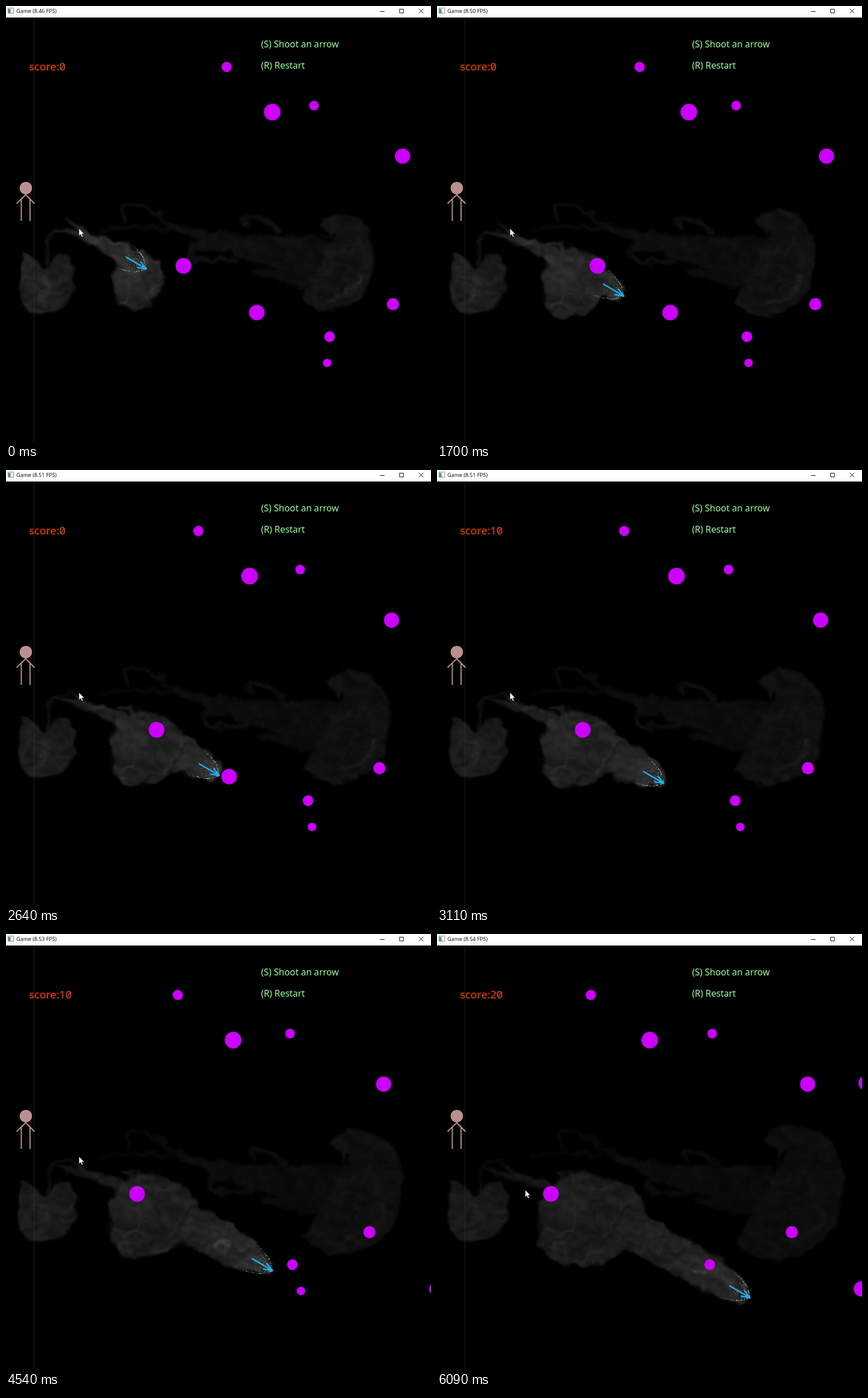
An HTML page with a canvas for the animation above (6260 ms loop, 739 by 758 pixels).

```html
<!DOCTYPE html>
<html lang="en">
<head>
<meta charset="utf-8">
<title>Game</title>
<style>
  html, body { margin: 0; width: 100%; height: 100%; overflow: hidden; background: #000; }
  canvas, svg { position: absolute; left: 0; top: 0; display: block; }
  text { font-family: "Noto Sans", sans-serif; }
  .bar { font: 9.3px "Open Sans", sans-serif; }
  .help { font-size: 15.75px; fill: #99ff99; }
  .score { font-size: 18.8px; fill: #ff4400; }
  .line { fill: none; stroke-linecap: round; }
</style>
</head>
<body>
<canvas id="stage" width="739" height="758"></canvas>
<svg width="739" height="758" viewBox="0 0 739 758">
  <rect width="739" height="20" fill="#fff"/>
  <rect x="3.5" y="3.5" width="10" height="9" fill="#f4f7f6" stroke="#8a9793"/>
  <rect x="4" y="5" width="4" height="7" fill="#4f9b80"/>
  <text id="title" class="bar" x="18" y="12"></text>
  <g class="line" stroke="#111">
    <path d="M650.5 9.5H658"/>
    <rect x="684.5" y="5.5" width="6.5" height="6.5"/>
    <path d="M718 5l7.5 7.5m0 -7.5l-7.5 7.5"/>
  </g>
  <text class="help" x="443.5" y="72">(S) Shoot an arrow</text>
  <text class="help" x="443.5" y="109">(R) Restart</text>
  <text id="score" class="score" x="40.3" y="112"></text>
  <path id="slash" class="line" stroke="#ff4400" stroke-width="1.2" d="M-2.3 3.5L2.3 -3.5"/>
  <circle cx="34.5" cy="316.5" r="10.8" fill="#bc8f8f"/>
  <path class="line" stroke="#bc8f8f" stroke-width="2" d="M19 343L34.3 328L49 343M26.6 336V373M41.8 336V373"/>
  <path id="cursor" fill="#fff" stroke="#222" stroke-width=".6" d="M0 0V12.5L2.8 10L4.8 14.6L6.8 13.7L4.8 9.2H8.7Z"/>
</svg>
<script>
const LOOP = 6260, LAST = 52;
const W = 739, H = 340, TOP = 320;
const $ = id => document.getElementById(id);
const ctx = $('stage').getContext('2d');
const mix = (a, b, u) => a + (b - a) * u;
const clamp = (v, lo, hi) => Math.max(lo, Math.min(hi, v));

function layer() {
  const c = document.createElement('canvas');
  c.width = W;
  c.height = H;
  return c.getContext('2d', { willReadFrequently: true });
}
const raw = layer(), soft = layer();
const out = ctx.createImageData(W, H);

function random(seed) {
  return () => {
    seed = (seed + 0x6D2B79F5) | 0;
    let t = Math.imul(seed ^ (seed >>> 15), 1 | seed);
    t = (t + Math.imul(t ^ (t >>> 7), 61 | t)) ^ t;
    return ((t ^ (t >>> 14)) >>> 0) / 4294967296;
  };
}

// Smooth value noise and the fields built from it
const grid = Float32Array.from({ length: 4096 }, random(11));
function noise(x, y) {
  const i = Math.floor(x), j = Math.floor(y);
  let u = x - i, v = y - j;
  u *= u * (3 - 2 * u);
  v *= v * (3 - 2 * v);
  const g = (a, b) => grid[((b & 63) << 6) | (a & 63)];
  return mix(mix(g(i, j), g(i + 1, j), u), mix(g(i, j + 1), g(i + 1, j + 1), u), v);
}
const warpX = new Float32Array(W * H), warpY = new Float32Array(W * H), tone = new Float32Array(W * H);
for (let y = 0, k = 0; y < H; y++) {
  for (let x = 0; x < W; x++, k++) {
    const amp = x > 400 && y < 170 ? 7 : 11;
    const a = noise(x / 17, y / 17), b = noise(x / 17 + 31, y / 17 + 9);
    warpX[k] = (a - .5) * amp + (noise(x / 7, y / 7) - .5) * 3;
    warpY[k] = (b - .5) * amp + (noise(x / 7 + 20, y / 7) - .5) * 3;
    const n = noise(x / 24 + a * 2.2, y / 15 + b * 2.2);
    const fine = noise(x / 9 + b * 2.5 + 40, y / 7 + a * 2.5);
    tone[k] = .6 + .55 * n + .3 * fine;
  }
}

// Catmull-Rom curve through flat x, y pairs
function spline(p, closed) {
  const n = p.length / 2, spans = closed ? n : n - 1, pts = [];
  const at = (i, c) => p[(closed ? (i + n) % n : clamp(i, 0, n - 1)) * 2 + c];
  for (let k = 0; k < spans * 16; k++) {
    const i = k >> 4, t = (k & 15) / 16;
    pts.push([0, 1].map(c => {
      const a = at(i - 1, c), b = at(i, c), d = at(i + 1, c), e = at(i + 2, c);
      return b + .5 * t * (d - a + t * (2 * a - 5 * b + 4 * d - e + t * (3 * (b - d) + e - a)));
    }));
  }
  return pts;
}

const gray = v => `rgb(${v},${v},${v})`;
const tip = s => [244 + 5.77 * s, 457 + 3.37 * s];
const DIR = [.864, .504];

function dots(c, pts) {
  c.beginPath();
  for (const [x, y, r] of pts) {
    c.moveTo(x, y);
    c.arc(x, y, Math.max(.5, r), 0, 7);
  }
  c.fill();
}

// Scale and shift each smoke part reaches by the end of the loop
const puff = [1.14, 1, -9.5, -1], head = [2.06, 1.56, -207, -245], cap = [1.5, 1.4, -250, -175];
const shift = (x, y) => [1, 1, x, y];
const tail = [1.1, .87, -8, 75];

function paintSmoke(u) {
  const pose = (pts, move) => pts.map((v, i) => mix(v, v * move[i % 2] + move[2 + i % 2], u));
  const blob = (g0, g1, move, ...pts) => {
    raw.fillStyle = gray(mix(g0, g1, u));
    raw.beginPath();
    spline(pose(pts, move), true).forEach(p => raw.lineTo(...p));
    raw.fill();
  };
  const strand = (g0, g1, r0, r1, move, ...pts) => {
    raw.fillStyle = gray(mix(g0, g1, u));
    const path = spline(pose(pts, move));
    dots(raw, path.map((p, i) => [...p, mix(r0, r1, (i / path.length) ** 1.5)]));
  };

  blob(29, 23, puff, 26, 436, 48, 438, 66, 457, 97, 431, 113, 446, 110, 508, 64, 535, 30, 515);
  strand(40, 26, 5, 9, puff, 64, 472, 70, 488, 64, 512);
  strand(22, 13, 3, 2, [1.07, 1, 0, 5], 70, 448, 74, 398, 104, 386);

  blob(18, 12, cap, 545, 380, 580, 362, 624, 382, 638, 440, 618, 502, 565, 530, 516, 512, 530, 480, 562, 405);
  strand(30, 15, 4, 5, cap, 565, 510, 606, 490, 614, 466);
  strand(14, 10, 6, 42, shift(10, 3), 300, 386, 370, 407, 450, 425, 550, 440);
  strand(10, 6, 3, 6, shift(0, -4), 165, 390, 230, 386, 300, 388);
  strand(13, 8, 3, 5, shift(12, -2), 205, 375, 205, 348, 250, 356, 305, 390);
  strand(14, 10, 5, 7, shift(48, 8), 395, 440, 330, 440, 325, 418, 370, 416);
  strand(14, 10, 4, 6, shift(14, 12), 420, 382, 415, 367, 450, 371, 475, 390);
  strand(14, 10, 5, 12, shift(20, 2), 435, 462, 470, 468, 520, 478);

  blob(36, 27, head, 188, 455, 215, 424, 258, 435, 274, 475, 248, 518, 210, 527, 189, 508, 188, 480);
  strand(44, 29, 2, 4, head, 262, 445, 267, 480, 247, 509);
  strand(42, 24, 1, mix(24, 16, u), tail, 106, 370, 140, 398, 180, 420, 225, 445);
  strand(34, 19, 1, 8, tail, 82, 386, 108, 390, 160, 412);
  strand(34, 20, 3, 7, shift(28, 6), 182, 411, 208, 414, 230, 432);

  raw.globalCompositeOperation = 'source-over';
  strand(0, 0, 2, mix(2, 4, u), cap, 543, 402, 564, 408, 569, 397);
}

function drawSmoke(s) {
  raw.globalCompositeOperation = 'source-over';
  raw.setTransform(1, 0, 0, 1, 0, -TOP);
  raw.fillStyle = '#000';
  raw.fillRect(0, TOP, W, H);
  raw.globalCompositeOperation = 'lighten';
  paintSmoke(s / LAST);
  raw.globalCompositeOperation = 'lighten';

  // Wake of the arrow widens with age
  for (let k = -2; k < s; k += .25) {
    const age = s - k, d = age * 6.68;
    raw.fillStyle = gray(26 + 18 * Math.exp(-age / 13));
    dots(raw, [[...tip(k), Math.min(d, 31, 3.6 * Math.sqrt(d))]]);
  }
  if (s > 28) {
    raw.fillStyle = gray(58);
    const [x, y] = tip(s - 14.5);
    dots(raw, [-12, -4, 5].map(dx => [x + dx, y + 3, 4.5]));
  }

  soft.filter = 'blur(2.2px)';
  soft.drawImage(raw.canvas, 0, 0);
  const src = soft.getImageData(0, 0, W, H).data, px = out.data;
  const drift = s >> 1;
  for (let y = 0, k = 0; y < H; y++) {
    for (let x = 0; x < W; x++, k++) {
      const sx = clamp(Math.round(x + warpX[k]), 0, W - 1);
      const sy = clamp(Math.round(y + warpY[k]), 0, H - 1);
      const v = src[(sy * W + sx) * 4] * tone[y * W + Math.max(0, x - drift)];
      px[k * 4] = px[k * 4 + 1] = px[k * 4 + 2] = v;
      px[k * 4 + 3] = 255;
    }
  }
  ctx.putImageData(out, 0, TOP);
}

function drawSparks(s) {
  const r = random(s * 97 + 5), [x, y] = tip(s);
  for (let i = 0; i < 210; i++) {
    const d = 46 * Math.pow(r(), .8), edge = r() < .45;
    const side = (r() < .5 ? -1 : 1) * (edge ? .93 + r() * .1 : r()) * Math.min(d, 3.8 * Math.sqrt(d));
    const tint = r();
    ctx.globalAlpha = (edge ? 1 : .6) * clamp(1.15 - d / 46, .1, 1) * (.35 + .65 * r());
    ctx.fillStyle = tint < .12 ? '#8fdcff' : tint < .22 ? '#e3a8ff' : '#fff';
    ctx.fillRect(Math.round(x - d * DIR[0] - side * DIR[1]), Math.round(y - d * DIR[1] + side * DIR[0]), 1, 1);
  }
  ctx.globalAlpha = 1;
}

function drawBalls(s) {
  const ball = (x, y, r, speed) => dots(ctx, [[x - speed * s, y, r]]);
  ctx.fillStyle = '#cc00ff';
  ball(383.7, 106, 8.9, 2.235);
  ball(463, 184.5, 14.4, 1.79);
  ball(535.6, 173.2, 8.4, 1.096);
  ball(689.5, 261, 13.2, .865);
  ball(308.7, 451.8, 13.7, 2.125);
  ball(673, 518.4, 10.6, 1.077);
  ball(562.7, 574.8, 9.3, 1.7);
  if (s < 23) ball(436.2, 533, 13.6, 2.19);
  else ball(779.5, 617, 13.2, .8);
  if (s < 46) ball(558.6, 620.6, 7.4, 1.2);
  else ball(830, 259, 13, 1.615);
}

function drawArrow(s) {
  const [x, y] = tip(s), back = Math.atan2(-DIR[1], -DIR[0]);
  const stroke = (turn, len) => {
    ctx.moveTo(x, y);
    ctx.lineTo(x + len * Math.cos(back + turn), y + len * Math.sin(back + turn));
  };
  ctx.strokeStyle = '#1cb2f2';
  ctx.lineWidth = 2.4;
  ctx.lineCap = 'round';
  ctx.beginPath();
  stroke(0, 40.5);
  stroke(.37, 15.5);
  stroke(-.37, 15.5);
  ctx.stroke();
}

const rates = ['8.46', '8.50', '8.51', '8.53', '8.53', '8.54'];

function draw(shot) {
  const s = Math.floor(shot * 4 / 3);
  ctx.fillStyle = '#000';
  ctx.fillRect(0, 0, 739, 758);
  drawSmoke(s);
  ctx.fillStyle = 'rgba(22,74,64,.5)';
  ctx.fillRect(48, 20, 1, 737);
  drawSparks(s);
  drawBalls(s);
  drawArrow(s);

  const points = s < 23 ? 0 : s < 46 ? 10 : 20;
  $('title').textContent = `Game (${rates[Math.floor((s + 1) / 10)]} FPS)`;
  $('score').textContent = 'score:' + points;
  $('slash').setAttribute('transform', `translate(${points ? 109.3 : 98.5} 105.3)`);
  const m = clamp((shot - 36) / 3, 0, 1);
  $('cursor').setAttribute('transform', `translate(${mix(127, 153.5, m)} ${mix(387, 445, m)})`);
}

let shown = -1;
const start = performance.now();
function tick() {
  const t = (performance.now() - start) % LOOP;
  const shot = clamp(1 + Math.floor((t - 130) / 156), 0, 39);
  if (shot !== shown) draw(shown = shot);
  requestAnimationFrame(tick);
}
tick();
</script>
</body>
</html>
```
